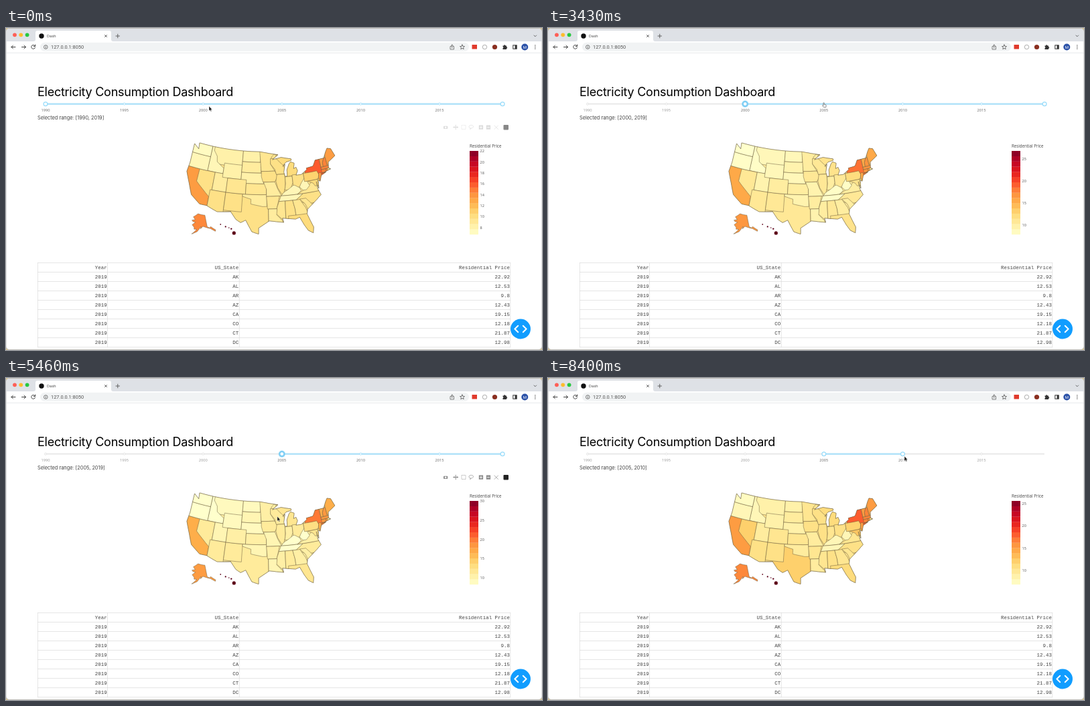
These frames come from a looping animation (800x482 px, 8470 ms). An HTML page:

```html
<!DOCTYPE html>
<html lang="en">
<head>
<meta charset="utf-8">
<title>Dash</title>
<style>
  html, body { margin: 0; width: 100%; height: 100%; overflow: hidden; background: #d8c79a; }
  svg { display: block; width: 100%; height: 100%; }
  .ui { font-family: Roboto, sans-serif; }
  .page { font-family: Inter, sans-serif; }
  .title { font-family: Inter, sans-serif; letter-spacing: -.25px; }
  .chart { font-family: "Open Sans", sans-serif; }
  .mono { font-family: "Liberation Mono", monospace; text-anchor: end; }
  .mid { text-anchor: middle; }
  .line { fill: none; stroke-linecap: round; stroke-linejoin: round; }
</style>
</head>
<body>
<svg viewBox="0 0 800 482">
  <defs><clipPath id="land"><path id="landShape"/></clipPath></defs>
  <g id="fixed"></g>
  <g id="chart"></g>
  <g id="slider"></g>
  <g id="modebar"></g>
  <g id="logo"><rect x="742.5" y="145" width="7.5" height="7.5" rx="1" fill="#222"/></g>
  <g id="tip" class="ui">
    <path d="M391.5 222.5L395 219.5V214H473V231H395V225.5Z" fill="#444" stroke="#fff" stroke-width=".6"/>
    <g fill="#fff" font-size="6.2" font-weight="700">
      <text x="396.5" y="221">US_State=IA</text><text x="396.5" y="229">Residential Price=10.82267</text>
    </g>
  </g>
  <g id="cursor"></g>
</svg>
<script>
const $ = id => document.getElementById(id);
const LOOP = 8470;
const rect = (x, y, w, h, fill, more = '') => `<rect x="${x}" y="${y}" width="${w}" height="${h}" fill="${fill}" ${more}/>`;
const disc = (x, y, r, fill, more = '') => `<circle cx="${x}" cy="${y}" r="${r}" fill="${fill}" ${more}/>`;
const line = (d, stroke = '#555', width = 1) => `<path class="line" d="${d}" stroke="${stroke}" stroke-width="${width}"/>`;
const text = (s, x, y, size, fill, cls) => `<text class="${cls}" x="${x}" y="${y}" font-size="${size}" fill="${fill}">${s}</text>`;

// Key points in degrees west, degrees north
const northCoast = `124.7 48.4 122.4 47.3 122.8 49 111 49 97 49 94.6 48.7 89.6 48 92 46.7 88.4 47.2 84.4 46.5
  84.4 46.1 86.5 45.8 87.6 45.1 88 44.6 87.1 45.2 87.8 43 87.4 41.7 86.6 41.9 86.5 43.6 85.5 45.1 84.8 45.7
  83.4 45.2 83.9 43.7 82.9 44 82.5 43 83.3 41.8 81.2 41.8 78.9 42.9 79 43.3 76.3 43.5 75 45 71.5 45 70 46.7
  69.2 47.4 67.8 47 67 44.8`;
const southCoast = `70.2 43.6 70.7 42 70 41.6 73.7 41 72 41.1 74 40.5 74.9 39 75.5 39.5 75.9 37.2 76.3 39.1 76.3 37
  75.6 35.3 77.9 33.9 81 32 81.4 30.7 80 26.8 80.4 25.2 81.8 26.1 82.8 27.8 83.9 30.1 85.3 29.7 89.5 30.3
  89.2 29.1 93.8 29.7 97.2 27.7 97.2 26 99.3 26.6 101.4 29.8 103 29 104.6 29.8 106.5 31.8 111 31.3
  114.8 32.5 117.1 32.5 120.6 34.5 122.5 37.6 124.4 40.4 124.2 43`;
const alaskaCoast = `156.8 71.3 141 69.7 141 60.3 137.5 58.9 135.5 59.7 130 56 131 55 136.5 58.2 144 60.1 148 61
  151.8 59.2 151 61 157 57 164.5 54.6 157.6 58.7 162 58.7 162 60 166 62 161 64.4 166 64.6 168 65.6 162 66.4
  166.5 68.4 163 69.5`;
const islands = [[159.5, 22.05, .9], [158, 21.4, 1.1], [157, 21.1, .8], [156.3, 20.8, 1.2], [155.5, 19.6, 2.6]];

// Bands: north, south, then side, state, side... A side a:b:c bends at equal steps of latitude.
const westBands = ['49.5 44.4 117 MT 104', '49.5 42 117 ID 116:116:114.4:114:111:111', '42 32 126 CA 114.6',
  '42 35 120:120:114.6 NV 114', '46 42 126 OR 117', '49.5 46 126 WA 117', '42 37 114 UT 109', '45 41 111 WY 104',
  '36.5 25 106.6 TX 94', '37 31 114.6 AZ 109', '37 32 109 NM 103', '37 33.7 103:103:100:100:100:96 OK 94.5',
  '49.5 46 104 ND 96.8', '46 43 104 SD 96.5', '43 40 104 NE 95.6', '41 37 109 CO 102', '40 37 102 KS 94.6'];
const middleBands = ['49.5 43.5 97.2:96.8:96.5 MN 89:92.3:92.8:91.2', '43.5 40.5 96.4:96.4:95.8 IA 91.2:90.2:91.4',
  '40.5 36.5 95.6:94.6:94.6 MO 91.4:90.5:89.3', '36.5 33 94.6:94.3 AR 90:91.2', '48 41.7 90.4 MI 82',
  '47 42.5 92.8:92.8:91.2:90.7 WI 90.5:87.6:86.8', '42.5 37 90.5:91:90.5:89.2 IL 87.5:87.5:87.7:88.5',
  '41.7 38 87.5:87.5:88 IN 84.8:84.8:86', '42 38.4 84.8 OH 80.5:80.5:82.6',
  '39.1 36.5 84.8:86.5:88.5:89.4 KY 84.3:82.6:82.2:83.7', '36.5 35 89.5:90.3 TN 81.7:84.3'];
const eastBands = ['36.5 33.5 81.7:84.3:81 NC 75', '35.1 32 83.1:81.5:80.9 SC 81:79.5:78.3',
  '35 30 90.3:91.1:91.6:89.6 MS 88.2:88.4 AL 85.6:85.1:85 GA 83.1:81.5:80.8',
  '33 28 94 LA 91.1:91.3:89.6:88.8', '30.8 24 87.5 FL 79', '39.3 36.5 78:80.2:83.7 VA 75',
  '40.5 37.4 80.6:81.8:82.6:81.5 WV 80.5:79.5:78.9:80.3', '39.7 38 79.4:77.5:77 MD 75.2',
  '45.1 40.5 79.8 NY 73.4:73.4:73.5:71.8', '42 39.7 80.5 PA 75.3:74.8:75.5', '41.3 39 74.8:75.1:75.5 NJ 73.9',
  '39.8 38.4 75.7 DE 75', '45.1 42.7 73.4 VT 71.5:72.4:72.5 NH 70.9', '47.5 43 70.9 ME 66',
  '42.7 42 73.4 MA 69.5', '42 41.1 73.5 CT 71.8 RI 71.2'];
const priceGroups = {
  '.03': 'WA', '.06': 'OR ID KY TN WV', '.1': 'WY NE ND MT', '.13': 'UT OK SD MO LA', '.17': 'AR IN MS CO KS MN SC VA GA',
  '.2': 'NV AZ NM TX IA WI AL NC OH IL', '.23': 'FL MI MD', '.27': 'PA DE', '.45': 'CA ME NJ VT', '.52': 'NH MA RI CT', '.6': 'NY'
};
const price = name => +Object.keys(priceGroups).find(k => priceGroups[k].includes(name));

// Albers equal-area conic that puts the point (west, lat) at x, y
function albers(axis, west, lat, par1, par2, scale, x, y) {
  const rad = Math.PI / 180, s1 = Math.sin(par1 * rad), n = (s1 + Math.sin(par2 * rad)) / 2;
  const c = 1 - s1 * s1 + 2 * n * s1;
  const raw = (w, l) => {
    const rho = scale * Math.sqrt(c - 2 * n * Math.sin(l * rad)) / n, a = n * (axis - w) * rad;
    return [rho * Math.sin(a), rho * Math.cos(a)];
  };
  const mid = raw(west, lat);
  return (w, l) => raw(w, l).map((v, i) => v - mid[i] + [x, y][i]);
}
const mainland = albers(96, 96.6, 38.7, 29.5, 45.5, 306, 380.3, 240.4);
const alaska = albers(154, 156, 58.5, 55, 65, 107, 286.4, 301.9);
const hawaii = albers(157, 160, 19.9, 8, 18, 306, 317.6, 305.3);

function outline(points, project) {
  const path = points.flatMap(([w, l], i) => {
    const [w2, l2] = points[(i + 1) % points.length];
    return [0, .25, .5, .75].map(u => project(w + (w2 - w) * u, l + (l2 - l) * u).map(v => v.toFixed(1)).join(' '));
  });
  return `M${path.join('L')}Z`;
}
const pairs = s => s.match(/[\d.]+ [\d.]+/g).map(p => p.split(' ').map(Number));
function bandShapes(band) {
  const [n, s, ...rest] = band.split(' ');
  const side = str => str.split(':').map((w, i, all) => [+w, +n + (s - n) * i / Math.max(1, all.length - 1)]);
  const edge = str => side(str.includes(':') ? str : `${str}:${str}`);
  const shapes = [];
  for (let i = 1; i < rest.length; i += 2)
    shapes.push({ name: rest[i], level: price(rest[i]), d: outline([...edge(rest[i - 1]), ...edge(rest[i + 1]).reverse()], mainland) });
  return shapes;
}
const coast = outline([...pairs(northCoast.replace(/\s+/g, ' ')), ...pairs(southCoast.replace(/\s+/g, ' '))], mainland);
const alaskaPath = outline(pairs(alaskaCoast.replace(/\s+/g, ' ')), alaska);
const shapes = [...westBands, ...middleBands, ...eastBands].flatMap(bandShapes);
$('landShape').setAttribute('d', coast);

const ramp = ['ffffcc', 'ffeda0', 'fed976', 'feb24c', 'fd8d3c', 'fc4e2a', 'e31a1c', 'bd0026', '800026'];
function heat(v) {
  const pos = Math.max(0, v) * 8, i = Math.min(7, Math.floor(pos)), f = pos - i;
  const part = (c, k) => parseInt(c.slice(k, k + 2), 16);
  return `rgb(${[0, 2, 4].map(k => Math.round(part(ramp[i], k) * (1 - f) + part(ramp[i + 1], k) * f))})`;
}

const periods = [
  { from: 0, range: '[1990, 2019]', min: 6.75, max: 22.05, step: 2, shift: 0 },
  { from: 2250, range: '[2000, 2019]', min: 7.9, max: 26.8, step: 5, shift: .045 },
  { from: 3650, range: '[2005, 2019]', min: 8.3, max: 30.05, step: 5, shift: .06 },
  { from: 7900, range: '[2005, 2010]', min: 6.9, max: 25.6, step: 5, shift: 0, raised: 'TX NV MD DE' }
];
const BANDS = 16;
function drawChart(p) {
  const level = s => s.level - p.shift + (p.raised && p.raised.includes(s.name) ? .08 : 0);
  let bar = '';
  for (let i = 0; i < BANDS; i++)
    bar += rect(692, 309 - (i + 1) * 125 / BANDS, 13, 125 / BANDS + .2, heat((i + .5) / BANDS));
  for (let v = Math.ceil(p.min / p.step) * p.step; v <= p.max; v += p.step)
    bar += text(v, 707.5, 311 - (v - p.min) / (p.max - p.min) * 125, 5.6, '#555', 'chart');
  $('chart').innerHTML = text('Selected range: ' + p.range, 47, 137, 7.35, '#444', 'page') +
    `<g stroke="#665a3c" stroke-width=".5" stroke-linejoin="round"><path d="${coast}" fill="${heat(.18 - p.shift)}"/><g clip-path="url(#land)">` +
    shapes.map(s => `<path d="${s.d}" fill="${heat(level(s))}"/>`).join('') +
    `</g><path d="${coast}" fill="none"/><path d="${alaskaPath}" fill="${heat(.51 - p.shift)}"/></g>` +
    islands.map(([w, l, r]) => disc(...hawaii(w, l), r, '#5c0018')).join('') +
    text('Residential Price', 692, 179, 6.2, '#444', 'chart') + bar;
}

function drawFixed() {
  let s = rect(0, .5, 800, 481, '#fff', 'rx="5" stroke="#b5b5b5" stroke-width=".8"') +
    '<path d="M.5 20V6Q.5 1 5.5 1H794.5Q799.5 1 799.5 6V20Z" fill="#dee1e6"/>' +
    '<path d="M41 20Q44 20 44 17V7Q44 4 47 4H154Q157 4 157 7V17Q157 20 160 20Z" fill="#fff"/>' +
    ['#ff5f57', '#febc2e', '#28c840'].map((c, i) => disc(13 + 9.3 * i, 10.3, 2.9, c)).join('') +
    disc(53, 12, 3.7, '#111') + text('Dash', 61, 14.2, 6, '#555', 'ui') +
    line('M147.5 10.5l3 3m0-3l-3 3M164 12h5.5m-2.75-2.75v5.5M788 11l1.8 1.8 1.8-1.8', '#555', .9) +
    rect(51, 21.8, 640, 13, '#f1f3f4', 'rx="6.5"') + rect(0, 36.8, 800, .7, '#dcdee1') +
    line('M14 28.5H8m2.5-2.5l-2.5 2.5 2.5 2.5M23.5 28.5h6m-2.5-2.5l2.5 2.5-2.5 2.5M43.3 27a2.9 2.9 0 1 0 .2 2.3M43.7 25v2.4h-2.4', '#444') +
    disc(59.3, 28.5, 2.8, 'none', 'stroke="#555" stroke-width=".8"') + line('M59.3 28.3v1.5M59.3 27v.1', '#555', .8) +
    text('127.0.0.1:8050', 67, 31, 7.4, '#555', 'ui') +
    line('M664.5 27.5h-1.5v4.5h5.5v-4.5h-1.5M665.8 30v-5m-1.5 1.5l1.5-1.5 1.5 1.5', '#666', .8) +
    line('M681 25l1 2.3 2.5 .2-1.9 1.7 .6 2.5-2.2-1.3-2.2 1.3 .6-2.5-1.9-1.7 2.5-.2Z', '#555', .8) +
    rect(695.5, 25, 7.5, 6.5, '#e03a2c') + disc(714.5, 28.5, 3.2, 'none', 'stroke="#aaa"') + disc(729.5, 28.5, 3.6, '#8a2f20') +
    '<path d="M741.5 26.5h1.5a1.2 1.2 0 0 1 2.4 0h1.6v1.7a1.2 1.2 0 0 1 0 2.4v1.4h-5.5v-1.8a1.2 1.2 0 0 0 0-2.3Z" fill="#333"/>' +
    rect(756.8, 25.8, 5.4, 5.4, 'none', 'stroke="#333"') + rect(759.6, 25.8, 2.6, 5.4, '#333') +
    disc(774.3, 28.5, 5, '#2c52a8') + text('M', 774.3, 30.7, 6, '#fff', 'ui mid') +
    [26, 28.5, 31].map(y => disc(789.8, y, .75, '#555')).join('') +
    text('Electricity Consumption Dashboard', 47, 102.2, 18, '#000', 'title');

  const rows = ['AK 22.92', 'AL 12.53', 'AR 9.8', 'AZ 12.43', 'CA 19.15', 'CO 12.18', 'CT 21.87', 'DC 12.98'];
  const cells = [['Year', 'US_State', 'Residential Price'], ...rows.map(r => ['2019', ...r.split(' ')])];
  const sides = [151.3, 347.8, 752.5];
  cells.forEach((row, i) => {
    const y = 351 + i * 14.05;
    s += rect(47, y, 706, .7, '#dadada') + row.map((c, j) => text(c, sides[j] - .6, y + 10, 7.45, '#444', 'mono')).join('');
  });
  s += rect(47, 477.5, 706, .7, '#dadada') + [47, ...sides].map(x => rect(x, 351, .7, 127, '#dadada')).join('') +
    disc(768, 450.5, 15, '#119dff') + line('M764.2 445.8l-4.8 4.7 4.8 4.7M771.8 445.8l4.8 4.7-4.8 4.7', '#fff', 2);
  $('fixed').innerHTML = s;

  const gray = '#8c8c8c';
  $('modebar').innerHTML = rect(653, 146.7, 6.2, 4.4, gray, 'rx=".8"') + disc(656.1, 148.9, 1.4, '#fff') +
    line('M668 148.5h6.5M671.25 145.3v6.5M669 147.5l-1 1 1 1M673.5 147.5l1 1-1 1', '#777', .8) +
    rect(680, 145.5, 6, 6, 'none', `stroke="${gray}" stroke-width=".7" stroke-dasharray="1.2 .8"`) +
    line('M692.5 150c-3-2-1.5-4.5 2-4.5s4 3 1 4.3-3.5-.8-2.3 .4-.3 1.5-.7 1.6', gray, .7) +
    rect(705.8, 145.5, 6.3, 6.3, gray) + rect(716.8, 145.5, 6.3, 6.3, gray) +
    line('M707.3 148.7h3.3m-1.65-1.65v3.3M718.3 148.7h3.3', '#fff', .9) +
    line('M729 146l5.5 5.5M734.5 146l-5.5 5.5', gray, .7);
}

// Pointer moves: start, end, x, y
const moves = [
  [250, 800, 59, 114], [900, 1250, 178, 114], [1450, 1950, 295, 114], [2800, 3350, 412, 115],
  [3750, 4850, 370, 219], [5300, 6150, 741, 114], [6500, 7500, 530, 114], [8000, 8300, 532, 119]
];
function pointer(t) {
  let x = 303, y = 119;
  for (const [start, end, toX, toY] of moves) {
    const u = Math.max(0, Math.min(1, (t - start) / (end - start))), e = u * u * (3 - 2 * u);
    x += (toX - x) * e;
    y += (toY - y) * e;
  }
  return [x, y];
}

const yearX = y => 59 + (y - 1990) * 23.52;
const snap = x => Math.round((x - 59) / 23.52) + 1990;
function handle(year, focus) {
  const x = yearX(year);
  return focus ? disc(x, 113.7, 5.4, '#96dbfa', 'opacity=".5"') + disc(x, 113.7, 3.5, '#fff', 'stroke="#7ccdf4" stroke-width="2.2"')
    : disc(x, 113.7, 2.9, '#fff', 'stroke="#96dbfa" stroke-width="1.2"');
}
function drawSlider(t, px) {
  const left = t < 900 ? 1990 : t < 2200 ? snap(px) : t < 3550 ? 2000 : 2005;
  const right = t < 6500 ? 2019 : t < 7800 ? snap(px) : 2010;
  let s = rect(59, 112.8, 682, 1.8, '#e6e6e6', 'rx=".9"') +
    rect(yearX(left), 112.6, yearX(right) - yearX(left), 2.2, '#abe2fb');
  for (let y = 1990; y < 2019; y += 5) {
    const on = y >= left && y <= right;
    s += disc(yearX(y), 113.7, 1.5, '#fff', `stroke="${on ? '#96dbfa' : '#dedede'}" stroke-width=".8"`) +
      text(y, yearX(y), 125, 5.7, on ? '#666' : '#999', 'chart mid');
  }
  $('slider').innerHTML = s + handle(left, t > 850 && t < 6200) + handle(right, t > 6150 && t < 8100);
}

const arrow = '<path d="M0 -2V5L1.6 3.7 2.7 6 3.7 5.5 2.7 3.3H4.7Z" fill="#111" stroke="#fff" stroke-width=".4"/>';
const hand = '<path d="M-1 -2.8q.6-.6 1.2 0V-.6l2.3 .6q.9 .3 .7 1.2L2.8 3.7H-.4L-2.4 1.2q.2-.8 1-.3l.4 .3Z" fill="#fff" stroke="#444" stroke-width=".6"/>';
const fade = (t, a, b) => Math.max(0, Math.min(1, (t - a) / 200, (b - t) / 200));

let shown = null;
function frame() {
  const t = performance.now() % LOOP;
  const period = periods.filter(p => p.from <= t).pop();
  if (period !== shown) drawChart(shown = period);
  const [x, y] = pointer(t);
  drawSlider(t, x);
  const bar = Math.max(fade(t, 4000, 5950), .3 * (1 - t / 300));
  $('modebar').style.opacity = bar;
  $('logo').style.opacity = Math.sqrt(bar);
  $('tip').style.display = t > 4650 && t < 5050 ? '' : 'none';
  $('cursor').setAttribute('transform', `translate(${x.toFixed(2)} ${y.toFixed(2)})`);
  $('cursor').innerHTML = y > 108 && y < 117.5 ? hand : arrow;
  requestAnimationFrame(frame);
}
drawFixed();
frame();
</script>
</body>
</html>
```
